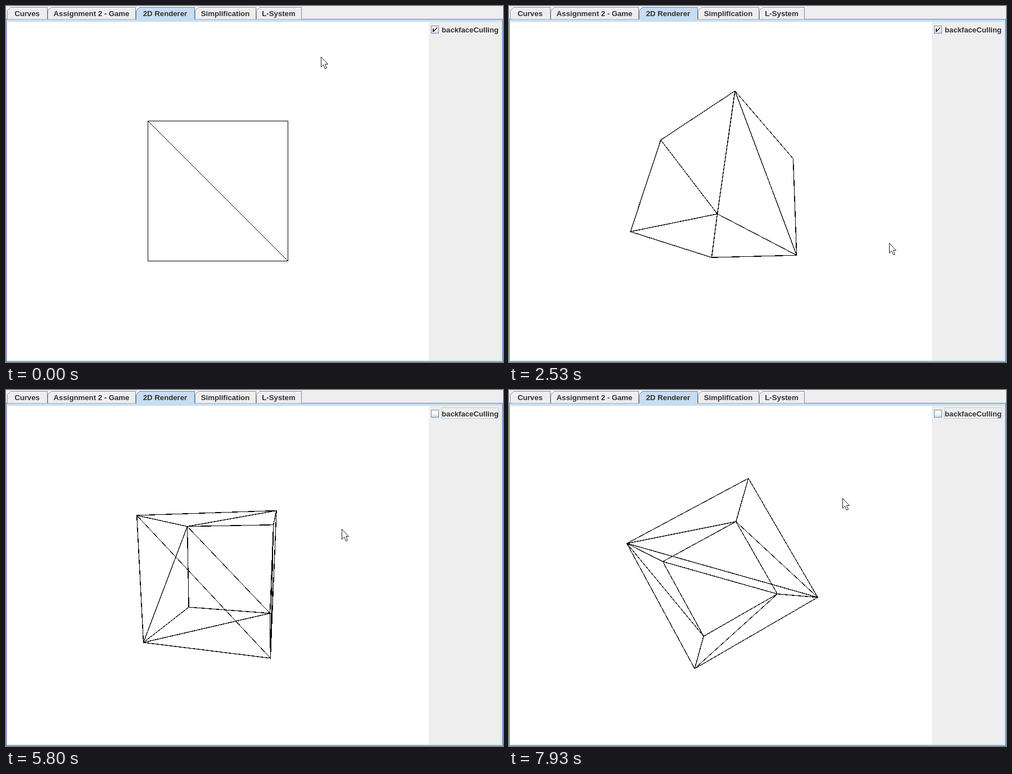
An HTML page with a canvas that plays this animation: 884x633 px, repeating every 8000 ms.

```html
<!DOCTYPE html>
<html lang="en">
<head>
<meta charset="utf-8">
<title>2D Renderer</title>
<style>
html, body { margin: 0; width: 100%; height: 100%; overflow: hidden; background: #eee; }
canvas { display: block; }
</style>
</head>
<body>
<canvas id="stage" width="884" height="633"></canvas>
<script>
const ctx = document.getElementById('stage').getContext('2d');
const LOOP = 8000, STEPS = 120;
const PRESS = 72, UNCHECK = 75, LEAVE = 77;
const GREY = '#7a8a99', BLUE = '#6382bf', PALE = '#c8ddf2', FOCUS = '#b8cfe5';

const TABS = ['Curves', 'Assignment 2 - Game', '2D Renderer', 'Simplification', 'L-System'];
const TAB_EDGES = [2, 74, 231, 336, 445, 526];
const SELECTED = 2;

// Each drag ends at a step with the pointer at a place and the cube turned about an axis;
// the length of the turn vector is its angle in radians.
const REST = [0, 0, 0], LEVEL = [-.0215, -.0255, .058];
const DRAGS = [
  { step: 0, pointer: [560, 90], turn: REST },
  { step: 8, pointer: [624, 265], turn: REST },
  { step: 19, pointer: [569, 313], turn: [.394, -.483, -.043] },
  { step: 38, pointer: [676, 421], turn: [-.391, .8, -.316] },
  { step: 56, pointer: [540, 489], turn: [.33, .089, .041] },
  { step: 61, pointer: [540, 495], turn: LEVEL },
  { step: 75, pointer: [769, 47], turn: LEVEL },
  { step: 82, pointer: [598, 235], turn: LEVEL },
  { step: 97, pointer: [593, 282], turn: [.616, -.838, -.239] },
  { step: 119, pointer: [593, 192], turn: [2.652, -1.555, .024] }
];

// Front square clockwise from its top left corner, then the back square
const CORNERS = Array.from({ length: 8 }, (_, i) =>
  [(i + 1) & 2 ? 1 : -1, i & 2 ? -1 : 1, i < 4 ? 1 : -1]);
// Faces counterclockwise from outside, split from first to third corner
const TRIANGLES = ['0321', '4567', '4015', '5126', '3762', '4730']
  .flatMap(([a, b, c, d]) => [[a, b, c], [a, c, d]]);

const mix = (a, b, u) => a.map((v, i) => v + (b[i] - v) * u);
const smooth = u => u * u * (3 - 2 * u);

function poseAt(step) {
  const next = Math.max(1, DRAGS.findIndex(drag => drag.step >= step));
  const from = DRAGS[next - 1], to = DRAGS[next];
  const u = smooth((step - from.step) / (to.step - from.step));
  return { pointer: mix(from.pointer, to.pointer, u), turn: mix(from.turn, to.turn, u) };
}

// Rodrigues rotation
function rotate([a, b, c], turn) {
  const angle = Math.hypot(...turn) || 1e-9;
  const [x, y, z] = turn.map(v => v / angle);
  const cos = Math.cos(angle), sin = Math.sin(angle);
  const along = (a * x + b * y + c * z) * (1 - cos);
  return [
    a * cos + (y * c - z * b) * sin + x * along,
    b * cos + (z * a - x * c) * sin + y * along,
    c * cos + (x * b - y * a) * sin + z * along
  ];
}

function project([x, y, z]) {
  const scale = 374.4 / (4 - z);
  return [376.5 + x * scale, 328.5 - y * scale];
}

function rect(color, x, y, w, h) {
  ctx.fillStyle = color;
  ctx.fillRect(x, y, w, h);
}

function frame(color, x, y, w, h) {
  ctx.strokeStyle = color;
  ctx.strokeRect(x + .5, y + .5, w - 1, h - 1);
}

function path(points) {
  ctx.beginPath();
  points.forEach(([x, y]) => ctx.lineTo(x + .5, y + .5));
}

// Hard-edged line, a little over one pixel thick
function line(a, b) {
  const steep = Math.abs(b[1] - a[1]) > Math.abs(b[0] - a[0]);
  const major = steep ? 1 : 0, minor = 1 - major;
  const [from, to] = a[major] < b[major] ? [a, b] : [b, a];
  const slope = (to[minor] - from[minor]) / (to[major] - from[major] || 1);
  for (let p = Math.round(from[major]); p <= Math.round(to[major]); p++) {
    const center = from[minor] + (p - from[major]) * slope;
    const low = Math.round(center - .18);
    const size = Math.round(center + .18) - low + 1;
    if (steep) ctx.fillRect(low, p, size, 1);
    else ctx.fillRect(p, low, 1, size);
  }
}

function drawTab(label, i) {
  const left = TAB_EDGES[i], right = TAB_EDGES[i + 1] - 1, selected = i === SELECTED;
  path([[left, 23], [left, 8], [left + 6, 2], [right, 2], [right, 23]]);
  ctx.fillStyle = selected ? PALE : '#eee';
  ctx.fill();
  ctx.strokeStyle = selected ? BLUE : GREY;
  ctx.stroke();
  if (selected) {
    rect(PALE, left + 1, 23, right - left - 1, 2);
  } else {
    path([[left + 1, 22], [left + 1, 8], [left + 6, 3], [right - 1, 3]]);
    ctx.strokeStyle = '#fff';
    ctx.stroke();
  }
  ctx.fillStyle = '#333';
  ctx.textAlign = 'center';
  ctx.fillText(label, (left + right) / 2, 18);
}

function drawWindow() {
  rect('#eee', 0, 0, 884, 633);
  rect(PALE, 0, 23, 884, 610);
  frame(BLUE, 0, 23, 884, 610);
  rect('#fff', 2, 28, 750, 602);
  rect('#eee', 752, 28, 129, 602);
  ctx.font = 'bold 13.2px "Liberation Sans", Arial, sans-serif';
  TABS.forEach(drawTab);
}

function drawCheckbox(step) {
  const shade = ctx.createLinearGradient(0, 36, 0, 48);
  shade.addColorStop(0, '#eef4fa');
  shade.addColorStop(.35, '#fff');
  shade.addColorStop(1, PALE);
  rect(shade, 756, 35, 14, 13);
  frame(GREY, 756, 35, 14, 14);
  if (step >= PRESS && step < LEAVE) {
    frame(FOCUS, 757, 36, 12, 12);
    frame(FOCUS, 758, 37, 10, 10);
  }
  if (step < UNCHECK) {
    rect('#222', 759, 40, 2, 6);
    line([761, 44], [766, 39]);
    line([761, 43], [766, 38]);
  }
  if (step >= PRESS) frame(FOCUS, 774, 31, 103, 20);
  ctx.fillStyle = '#333';
  ctx.textAlign = 'left';
  ctx.fillText('backfaceCulling', 775, 47);
}

function drawCube(turn, culling) {
  const points = CORNERS.map(corner => project(rotate(corner, turn)));
  ctx.fillStyle = '#000';
  for (const triangle of TRIANGLES) {
    const [a, b, c] = triangle.map(i => points[i]);
    const area = (b[0] - a[0]) * (c[1] - a[1]) - (b[1] - a[1]) * (c[0] - a[0]);
    if (culling && area >= 0) continue;
    line(a, b);
    line(b, c);
    line(c, a);
  }
}

function drawPointer(tip) {
  const [x, y] = tip.map(Math.round);
  const outline = [[0, 0], [0, 18], [4, 14], [7, 21], [10, 20], [7, 13], [12, 13]];
  path(outline.map(([dx, dy]) => [x + dx, y + dy]));
  ctx.closePath();
  ctx.fillStyle = '#fff';
  ctx.fill();
  ctx.strokeStyle = '#1c1c2c';
  ctx.stroke();
}

function draw(now) {
  const step = Math.floor((now % LOOP + 3.4) * STEPS / LOOP) % STEPS;
  const { pointer, turn } = poseAt(step);
  drawWindow();
  drawCheckbox(step);
  drawCube(turn, step < UNCHECK);
  drawPointer(pointer);
}

const start = performance.now();
function tick() {
  draw(performance.now() - start);
  requestAnimationFrame(tick);
}
tick();
</script>
</body>
</html>
```
